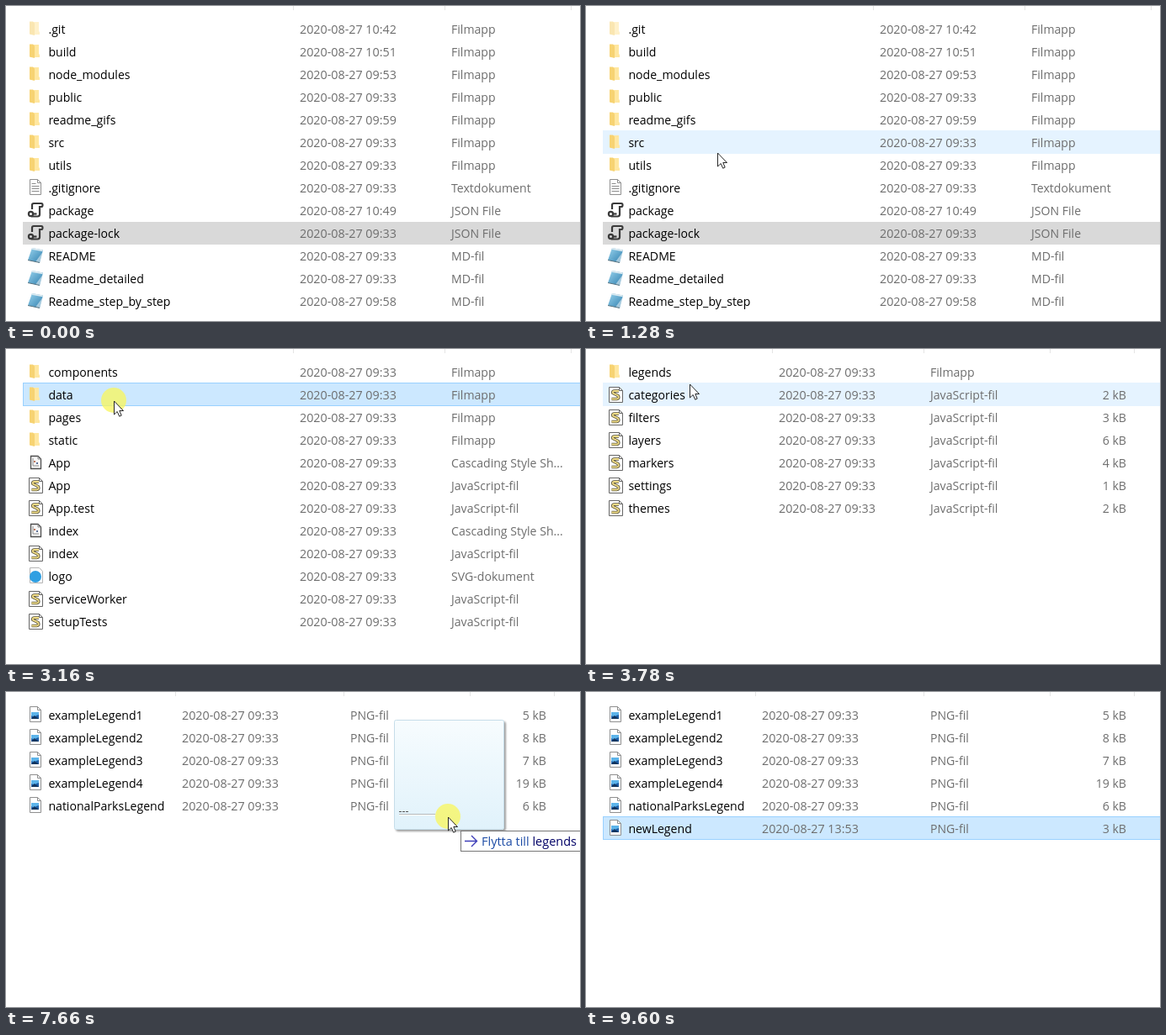
An HTML page for the animation above (9830 ms loop, 682x375 px).

```html
<!DOCTYPE html>
<html lang="sv">
<head>
<meta charset="utf-8">
<title>File explorer</title>
<style>
html, body { margin: 0; width: 100%; height: 100%; overflow: hidden; background: #fff; }
svg { display: block; width: 682px; height: 375px; }
text { font: 14.1px "Open Sans", "Noto Sans", sans-serif; fill: #6d6d6d; white-space: pre; }
.name { fill: #000; }
.date { font-size: 14.3px; }
.tip { font-size: 14.5px; fill: #1c4ba5; }
</style>
</head>
<body>
<svg id="stage" viewBox="0 0 682 375">
  <defs>
    <linearGradient id="glass" x2="0" y2="1">
      <stop offset="0" stop-color="#f7fcfe"/>
      <stop offset="1" stop-color="#dff2fb"/>
    </linearGradient>
    <linearGradient id="cover" x2="1" y2="1">
      <stop offset="0" stop-color="#9ad4ee"/>
      <stop offset="1" stop-color="#2f7fae"/>
    </linearGradient>
    <filter id="shadow" x="-10%" y="-10%" width="125%" height="125%">
      <feDropShadow dx="2" dy="2" stdDeviation="1.3" flood-opacity=".4"/>
    </filter>
    <g id="folder">
      <path d="M29 5h10v11l1 1v3H29z" fill="#ffe7a0"/>
      <path d="M28 4.500h4l2 2V21l-6-1.500z" fill="#f7d372"/>
    </g>
    <g id="faded"><use href="#folder" opacity=".55"/></g>
    <g id="page">
      <path d="M28.5 3.5h9l4 4v14h-13z" fill="#fff" stroke="#8f8f8f"/>
      <path d="M37.5 3.5v4h4" fill="none" stroke="#8f8f8f"/>
    </g>
    <g id="txt">
      <use href="#page"/>
      <path d="M30.5 8.5h5M30.5 11.5h9M30.5 14.5h9M30.5 17.5h9" stroke="#8a8a8a"/>
    </g>
    <g id="png">
      <use href="#page"/>
      <path d="M30 10h9v8h-9z" fill="#1d5fa8"/>
      <path d="M30 10h9v3l-3 1-3 1.5-3-1.5z" fill="#5db4ea"/>
      <path d="M30 18l3.5-4 3 2 2.500 2z" fill="#12365f"/>
    </g>
    <g id="json" fill="none" stroke="#3a3a3a" stroke-width="2.200">
      <path d="M31 12V7q0-2 2-2h9q1.500 0 1.500 2t-1.500 2h-2v9q0 2.500-2.500 2.500H30"/>
      <circle cx="29.500" cy="17.500" r="2.600"/>
      <path d="M32 17.500h4.500"/>
    </g>
    <g id="md">
      <path d="M31 4l13 2.500-4 15-14-3z" fill="url(#cover)"/>
      <path d="M31 4l13 2.500-.5 1.800-13-2.500z" fill="#dceaf1"/>
      <path d="M44 8.500l-4 13-5-1z" fill="#d7e6ee" opacity=".65"/>
      <path d="M26 18.500l14 3" stroke="#55707e"/>
    </g>
    <g id="css">
      <path d="M29.500 5.500h8.500l3.500 3.500v11.500h-12z" fill="#f8f8f8" stroke="#4d4d4d" stroke-width="1.300"/>
      <path d="M38 5.500V9h3.500M32 8v9h7" fill="none" stroke="#8a8a8a"/>
      <path d="M33 11h2v2h-2z" fill="#c07a62"/>
      <path d="M36 13h2v2h-2z" fill="#5b6f98"/>
    </g>
    <g id="js">
      <path d="M27.500 4.500h12l4 4v14h-16z" fill="#fff" stroke="#666"/>
      <path d="M39.500 4.500v4h4" fill="none" stroke="#666"/>
      <g id="scroll" fill="none">
        <path id="curl" d="M39 9h-5q-3 0-2 2.500l6 3q2 3.500-1.500 4h-6" stroke="#555038" stroke-width="3.600"/>
        <path d="M39 9h-5q-3 0-2 2.500l6 3q2 3.500-1.500 4h-6" stroke="#f0dc86" stroke-width="1.900"/>
      </g>
    </g>
    <g id="svg">
      <path d="M28.500 3.500h11l4 4v14h-15z" fill="#fff" stroke="#b5b5b5"/>
      <circle cx="35" cy="14" r="7" fill="#2f9fe2"/>
    </g>
  </defs>
  <rect id="grey" x="20" y="257" width="662" height="27" fill="#d9d9d9"/>
  <rect id="hover" x="20" width="662" height="28" fill="#e5f3ff"/>
  <rect id="chosen" x="20.500" width="663" height="27" fill="#cce8ff" stroke="#99d1ff"/>
  <g id="views"></g>
  <g id="pointer">
    <g id="drag">
      <rect x="-63.500" y="-114.500" width="130" height="130" rx="2" fill="url(#glass)" stroke="#c3dce8" opacity=".95" filter="url(#shadow)"/>
      <path d="M-58 -5.500h12" stroke="#555" stroke-dasharray="3 1"/>
      <path d="M-58 -2.500h43" stroke="#b4b9bb"/>
      <path d="M-58 -1.500h43" stroke="#fff"/>
    </g>
    <circle id="press" r="15" fill="#f8f65c" opacity=".76"/>
    <g id="hint">
      <rect x="15.500" y="17.500" width="145" height="24" fill="#fff" stroke="#767676"/>
      <path d="M20 29.500h14M28 23l6.500 6.500-6.500 6.500" fill="none" stroke="#3d3db8" stroke-width="1.400"/>
      <text class="tip" x="40" y="35">Flytta till <tspan fill="#000066">legends</tspan></text>
    </g>
    <path d="M.5 1V17L4.200 13.500 6.700 19.200 9.200 18.100 6.800 12.500H11.500z" fill="#fff" stroke="#111" stroke-width=".9"/>
  </g>
</svg>
<script>
const LOOP = 9830, TOP = 14, ROW = 27;
const NS = "http://www.w3.org/2000/svg";
const $ = id => document.getElementById(id);
const DAY = "2020-08-27 ";
const TYPES = {
  folder: "Filmapp", faded: "Filmapp", txt: "Textdokument", json: "JSON File", md: "MD-fil",
  css: "Cascading Style Sh...", js: "JavaScript-fil", svg: "SVG-dokument", png: "PNG-fil"
};

// Rows: icon, name, time, size
const list = s => s.trim().split("\n").map(r => r.trim().split(/\s+/));
const png = list(`
  png exampleLegend1 09:33 5
  png exampleLegend2 09:33 8
  png exampleLegend3 09:33 7
  png exampleLegend4 09:33 19
  png nationalParksLegend 09:33 6`);
const fresh = ["png", "newLegend", "13:53", "3"];
const wide = [341, 521, 671], narrow = [201, 401, 551, 651];

const views = [
  { from: 0, ticks: wide, rows: list(`
    faded .git 10:42
    folder build 10:51
    folder node_modules 09:53
    folder public 09:33
    folder readme_gifs 09:59
    folder src 09:33
    folder utils 09:33
    txt .gitignore 09:33
    json package 10:49
    json package-lock 09:33
    md README 09:33
    md Readme_detailed 09:33
    md Readme_step_by_step 09:58`) },
  { from: 1910, ticks: wide, rows: list(`
    folder components 09:33
    folder data 09:33
    folder pages 09:33
    folder static 09:33
    css App 09:33
    js App 09:33
    js App.test 09:33
    css index 09:33
    js index 09:33
    svg logo 09:33
    js serviceWorker 09:33
    js setupTests 09:33`) },
  { from: 3310, ticks: [221, 401, 551, 651], rows: list(`
    folder legends 09:33
    js categories 09:33 2
    js filters 09:33 3
    js layers 09:33 6
    js markers 09:33 4
    js settings 09:33 1
    js themes 09:33 2`) },
  { from: 4480, ticks: narrow, rows: png },
  { from: 8360, ticks: narrow, rows: [...png.slice(0, 4), fresh, png[4]] },
  { from: 8510, ticks: narrow, rows: [...png, fresh] }
];

// Pointer moves: start, last step, steps, end point, easing powers for x and y
const moves = [
  [0, 0, 1, 232, 390, 1, 1],
  [590, 1450, 12, 152, 163, 1.67, 1.67],
  [2140, 2780, 9, 128, 61, 3.4, 1.26],
  [3710, 3860, 3, 120, 31, 1, 1],
  [7660, 7660, 1, 525, 148, 1, 1],
  [7740, 8130, 6, 231, 194, 1.5, 1.5],
  [8990, 8990, 1, 233, 191, 1, 1],
  [9370, 9530, 3, 425, 304, 1, 1]
];
const shown = [[590, 4480], [7660, 8360], [8760, 9600]];
const pressed = [[1600, 1680], [1760, 1830], [2990, 3080], [3160, 3230], [4240, 4320], [4400, 4480], [7660, 8280]];
// Selected rows: start, end, row
const picks = [[1600, 1910, 5], [2990, 3310, 1], [4240, 4480, 0], [8360, 8510, 4], [8510, LOOP, 5]];

const within = (spans, t) => spans.find(s => t >= s[0] && t < s[1]);
const show = (el, on) => el.setAttribute("display", on ? "inline" : "none");

function add(parent, tag, attrs, text) {
  const el = document.createElementNS(NS, tag);
  for (const k in attrs) el.setAttribute(k, attrs[k]);
  if (text) el.textContent = text;
  return parent.appendChild(el);
}

for (const v of views) {
  v.el = add($("views"), "g", {});
  for (const x of v.ticks) add(v.el, "rect", { x, y: 0, width: 1, height: 5, fill: "#e5e5e5" });
  v.rows.forEach(([icon, name, time, size], i) => {
    const g = add(v.el, "g", { transform: `translate(0 ${TOP + i * ROW})` });
    add(g, "use", { href: "#" + icon });
    add(g, "text", { class: "name", x: 50.4, y: 19 }, name);
    add(g, "text", { class: "date", x: v.ticks[0] + 8, y: 19 }, DAY + time);
    add(g, "text", { x: v.ticks[1] + 8, y: 19 }, TYPES[icon]);
    if (size) add(g, "text", { x: 642, y: 19, "text-anchor": "end" }, size + " kB");
  });
}

function pointerAt(t) {
  let x = 0, y = 0;
  for (const [a, b, n, ex, ey, px, py] of moves) {
    if (t < a) break;
    const gap = n > 1 ? (b - a) / (n - 1) : 1;
    const u = Math.min(1, (Math.floor((t - a + 15) / gap) + 1) / n);
    x += (ex - x) * (1 - (1 - u) ** px);
    y += (ey - y) * (1 - (1 - u) ** py);
  }
  return [Math.round(x), Math.round(y)];
}

function draw(t) {
  const view = views.filter(v => t >= v.from).pop();
  for (const v of views) show(v.el, v === view);

  const [x, y] = pointerAt(t);
  const visible = within(shown, t), dragging = t >= 7660 && t < 8360;
  $("pointer").setAttribute("transform", `translate(${x} ${y})`);
  show($("pointer"), visible);
  show($("press"), within(pressed, t));
  show($("drag"), dragging);
  show($("hint"), dragging);

  const row = Math.floor((y - TOP) / ROW);
  $("hover").setAttribute("y", TOP - 1 + row * ROW);
  show($("hover"), visible && !dragging && row >= 0 && row < view.rows.length);

  const pick = within(picks, t);
  if (pick) $("chosen").setAttribute("y", TOP - 0.5 + pick[2] * ROW);
  show($("chosen"), pick);
  show($("grey"), t < 1600);
}

const start = performance.now();
function tick() {
  draw((performance.now() - start) % LOOP);
  requestAnimationFrame(tick);
}
tick();
</script>
</body>
</html>
```
